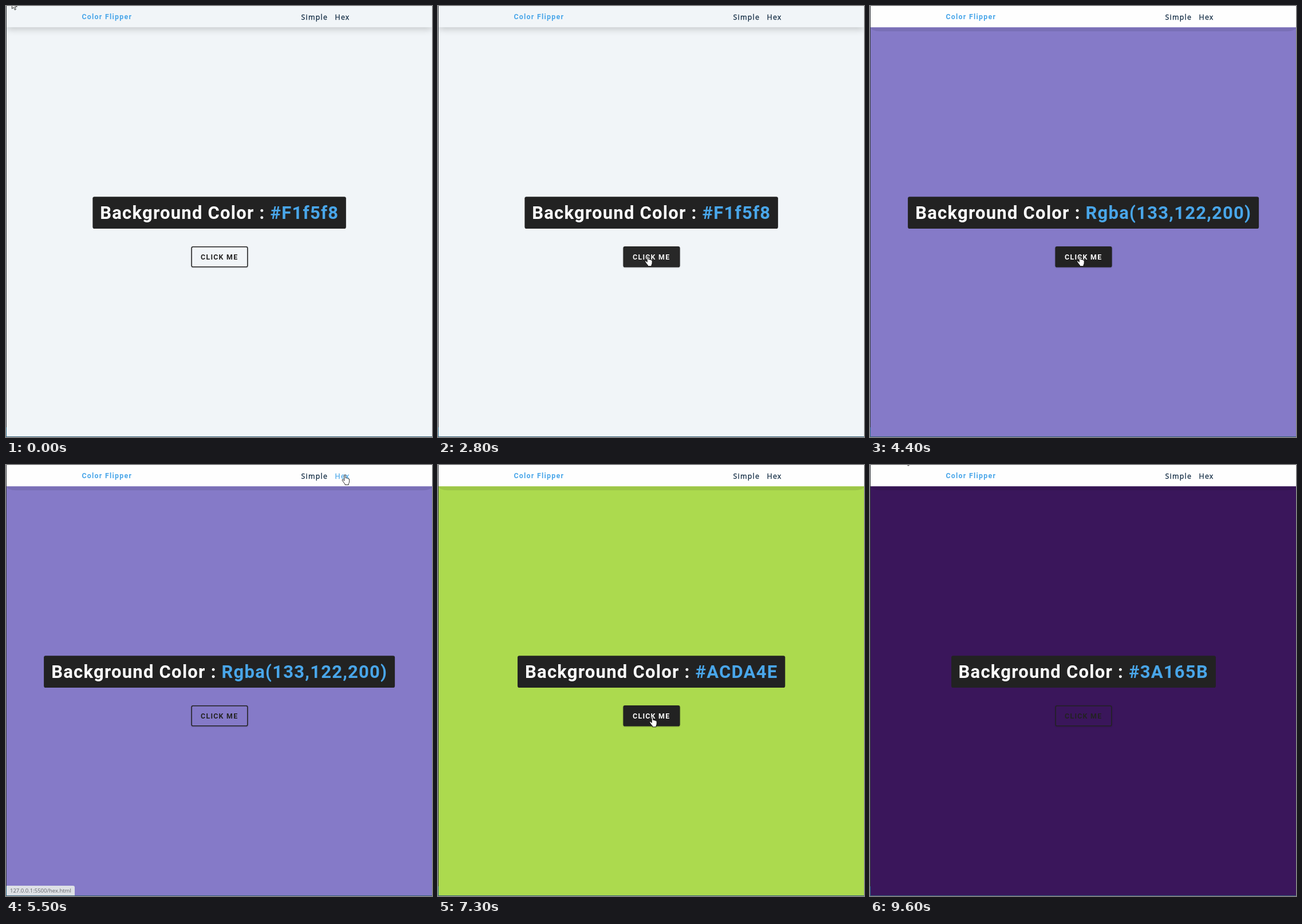
These frames come from a looping animation (744 by 753 pixels, 9.7 s). An HTML page:

```html
<!DOCTYPE html>
<html lang="en">
<head>
<meta charset="utf-8">
<title>Color Flipper</title>
<style>
  html, body { margin: 0; width: 100%; height: 100%; overflow: hidden; }
  #stage { position: relative; width: 744px; height: 753px; overflow: hidden; }
  #page {
    position: absolute; left: 1px; top: 0; width: 959.3px; height: 970.5px;
    transform: scale(.775); transform-origin: 0 0;
    font: 16px "Open Sans", sans-serif; letter-spacing: 1.6px;
  }
  nav { position: absolute; z-index: 1; width: 100%; height: 48px; background: #fefefe; }
  nav div { width: 620px; height: 48px; margin: auto; display: flex; align-items: center; }
  nav b { flex: 1; font-family: Roboto, sans-serif; color: #49a6e9; }
  nav a {
    position: relative; top: 1px; margin-right: 16px;
    color: #102a42; -webkit-text-stroke: .4px;
  }
  nav a.over { color: #49a6e9; }
  #band {
    position: absolute; top: 48px; width: 100%; height: 9px;
    background: rgba(0, 0, 0, .09); border-radius: 0 0 20px 20px / 0 0 9px 9px;
  }
  .light nav { background: inherit; box-shadow: 0 5px 15px rgba(0, 0, 0, .2); }
  .light #band { display: none; }
  main {
    position: absolute; top: 48px; bottom: 0; width: 100%;
    display: flex; flex-direction: column; align-items: center; justify-content: center;
    font-family: Roboto, sans-serif; font-weight: 700;
  }
  h2 {
    margin: 0 0 40px; padding: 17px 16.5px 15px; font-size: 40px; line-height: 40px;
    white-space: pre; color: #fff; background: #222; border-radius: 4px;
  }
  h2 span { color: #49a6e9; }
  #button {
    padding: 12px 20px; border: 2px solid #222; border-radius: 4px;
    box-shadow: 0 1px 3px rgba(0, 0, 0, .2);
  }
  #status {
    position: absolute; left: 1px; top: 735px; height: 17px; padding: 0 6px;
    font: 9.5px/17px "Open Sans", sans-serif; color: #5f6368; background: #dee1e6;
    border-radius: 0 3px 0 0;
  }
  .edge { position: absolute; left: 0; bottom: 0; width: 1px; }
  svg { position: absolute; left: 0; top: 0; overflow: visible; }
  path { fill: #fff; stroke: #000; stroke-linejoin: round; }
</style>
</head>
<body>
<div id="stage">
  <div id="page">
    <nav><div><b>Color Flipper</b><a id="simple">Simple</a><a id="hex">Hex</a></div></nav>
    <div id="band"></div>
    <main>
      <h2>Background Color : <span id="label"></span></h2>
      <div id="button">CLICK ME</div>
    </main>
  </div>
  <div id="status"></div>
  <div class="edge" style="height:100%;background:#383c40"></div>
  <div class="edge" style="height:17px;background:#2a6a88"></div>
  <div class="edge" style="width:100%;height:1px;background:#35617a"></div>
  <svg width="1" height="1"><g id="cursor">
    <path id="arrow" d="M0 0V16L3.6 12.7 6 18.5 8.5 17.5 6.1 11.8 11 11.5Z"/>
    <path id="hand" d="M-1.5 1.5Q-1.5 0 0 0T1.5 1.5V7Q3 6.3 4.3 7.6 6 7 7 8.6 9 8.2 9.5 10V15Q9.5 17.5 8 19.5V22H0V20Q-2.5 17.5-4 15L-6 12Q-6.5 10.6-5 10.4-3.5 10.4-1.5 13Z"/>
  </g></svg>
</div>
<script>
const LOOP = 9700, TICK = 100, FADE = 300, PLAIN = '#F1f5f8';
const $ = id => document.getElementById(id);

// each label is also the page's CSS background
const scenes = [
  [0, PLAIN], [3000, 'Red'], [3300, 'Rgba(133,122,200)'], [3800, '#F15025'],
  [4400, 'Rgba(133,122,200)'], [5700, PLAIN], [6800, '#D9774B'],
  [7300, '#ACDA4E'], [7900, '#4B8FA3'], [8300, '#3A165B']
];

const spot = {
  corner: [10.5, -8], button: [366.5, 437], buttonRight: [380.5, 440.5], buttonMid: [374.5, 440],
  simple: [545, 15], hex: [592, 17], belowHex: [580, 32], navTop: [527, 3], exit: [61.5, -13.5]
};

// pointer trips: departure, arrival, destination
const trips = [
  [0, 1, 'corner'],
  [500, 1000, 'button'], [1100, 1500, 'belowHex'], [1500, 1800, 'simple'],
  [2200, 2680, 'button'], [4500, 4700, 'simple'], [4900, 5100, 'hex'],
  [6100, 6620, 'buttonRight'], [6900, 7100, 'buttonMid'],
  [8400, 8800, 'hex'], [8800, 9000, 'navTop'], [9000, 9200, 'exit']
];

const areas = {};
for (const id of ['button', 'simple', 'hex']) areas[id] = $(id).getBoundingClientRect();

const easeOut = k => 1 - (1 - k) ** 3;

function pointer(t) {
  let pos = spot.corner;
  for (const [from, to, name] of trips) {
    if (t <= from) break;
    const k = easeOut(Math.min(1, (t - from) / (to - from)));
    pos = pos.map((v, i) => v + (spot[name][i] - v) * k);
  }
  return pos;
}

function hovered(t) {
  const [x, y] = pointer(t);
  return Object.keys(areas).find(id => {
    const r = areas[id];
    return x >= r.left && x <= r.right && y >= r.top && y <= r.bottom;
  });
}

// linear transition: share of the last FADE ms spent over the button
function hoverAmount(t) {
  const n = 30;
  let hits = 0;
  for (let i = 0; i < n; i++) hits += hovered(t - i * FADE / n) === 'button';
  return hits / n;
}

function draw(time) {
  const t = Math.floor(time % LOOP / TICK) * TICK;
  const label = scenes.filter(s => s[0] <= t).pop()[1];
  $('page').style.background = label;
  $('page').className = label === PLAIN ? 'light' : '';
  $('label').textContent = label;

  const h = hoverAmount(t), tone = Math.round(34 + 221 * h);
  $('button').style.background = `rgba(34,34,34,${h})`;
  $('button').style.color = `rgb(${tone},${tone},${tone})`;

  const target = hovered(t);
  for (const id of ['simple', 'hex']) $(id).className = id === target ? 'over' : '';
  $('hand').style.display = target ? '' : 'none';
  $('arrow').style.display = target ? 'none' : '';
  $('cursor').setAttribute('transform', `translate(${pointer(t)}) scale(.8)`);

  // the address shows once the pointer rests on a link
  const resting = target && target !== 'button' && hovered(t - TICK) === target;
  $('status').style.display = resting ? '' : 'none';
  $('status').textContent = `127.0.0.1:5500/${target === 'hex' ? 'hex' : 'index'}.html`;
}

const start = performance.now();
function frame() {
  draw(performance.now() - start);
  requestAnimationFrame(frame);
}
frame();
</script>
</body>
</html>
```
